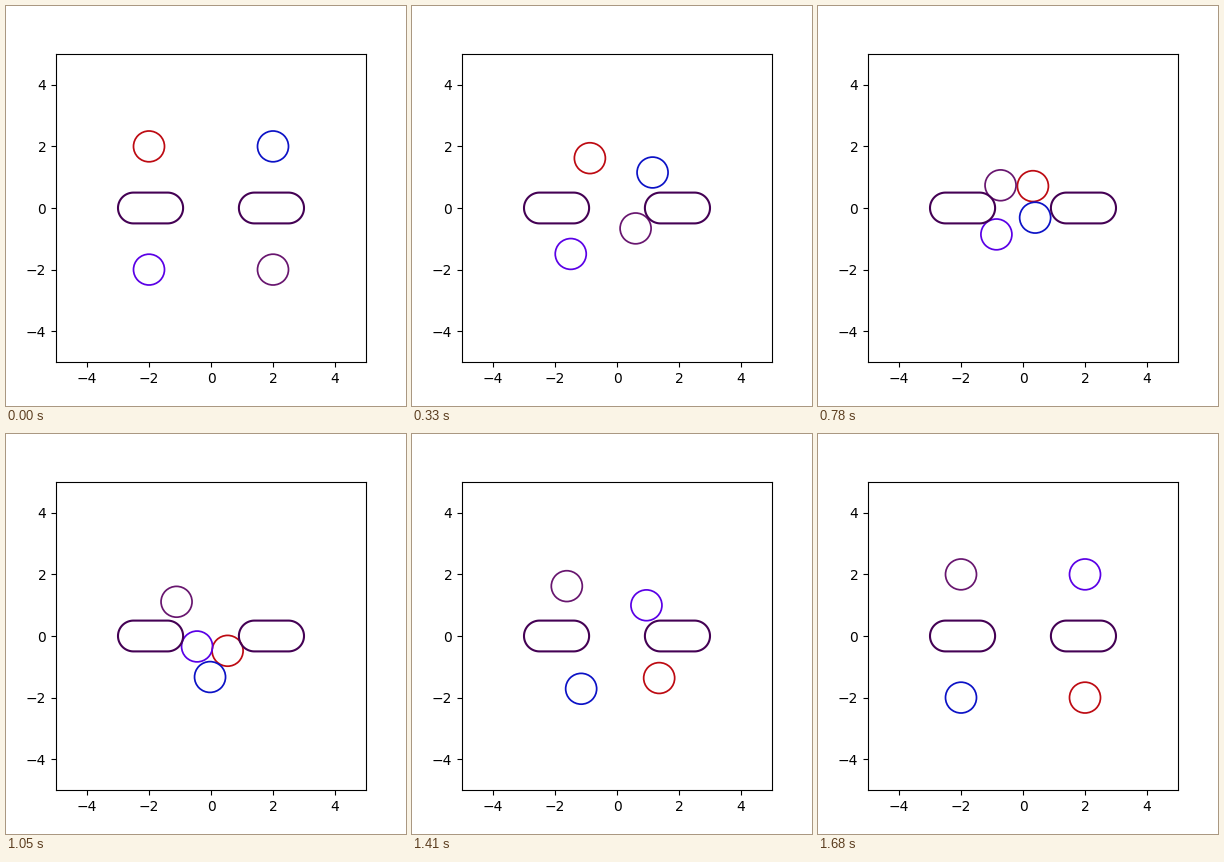
These frames come from a looping animation (400 by 400 pixels, 1710 ms). A matplotlib script:

```python
import numpy as np
import matplotlib.pyplot as plt
from matplotlib.animation import FuncAnimation
from matplotlib.patches import Circle, Polygon

RADIUS = 0.5
LAST = 38      # final step of the plan
TICKS = 57     # 30 ms ticks per loop
CAP = np.array([-1.4, 0])  # centre of the left capsule's inner end

# Key points (step, x, y), joined at constant speed.
OUTER = [(0, -2, 2), (15.5, 0.18, 1.26), (18, 0.32, 0.71),
         (24.4, 0.55, -0.56), (LAST, 2, -2)]
INNER = [(0, 2, -2), (14, -0.45, 0.34), (15, -0.54, 0.54), (LAST, -2, 2)]


def along(path, step):
    t, x, y = zip(*path)
    pos = np.array([np.interp(step, t, x), np.interp(step, t, y)])
    # Slide around the capsule end instead of overlapping it.
    offset = pos - CAP
    gap = np.hypot(*offset)
    if gap < 2 * RADIUS:
        pos = CAP + offset * 2 * RADIUS / gap
    return pos


def mirrored(path, step):
    """Same path, flipped in y and run backwards."""
    return along(path, LAST - step) * (1, -1)


def capsule(x0, x1):
    a = np.linspace(-np.pi / 2, np.pi / 2, 60)
    cap = RADIUS * np.c_[np.cos(a), np.sin(a)]
    return Polygon(np.vstack([cap + (x1, 0), -cap + (x0, 0)]), fill=False,
                   ec="#440154", lw=1.5, zorder=2)


fig, ax = plt.subplots(figsize=(4, 4), dpi=100)
ax.set(xlim=(-5, 5), ylim=(-5, 5),
       xticks=range(-4, 5, 2), yticks=range(-4, 5, 2))
ax.add_patch(capsule(-2.5, -1.4))
ax.add_patch(capsule(1.4, 2.5))

MOVERS = [
    ("#bd0a12", along, OUTER),
    ("#0c12c6", mirrored, OUTER),
    ("#5a00e6", mirrored, INNER),
    ("#68166f", along, INNER),
]
discs = [ax.add_patch(Circle(move(path, 0), RADIUS, fill=False, ec=color, lw=1.25))
         for color, move, path in MOVERS]


def update(tick):
    step = tick - tick // 3  # two steps every three ticks
    for disc, (_, move, path) in zip(discs, MOVERS):
        disc.center = move(path, step)
    return discs


anim = FuncAnimation(fig, update, frames=TICKS, interval=30,
                     repeat=True, repeat_delay=0, blit=False)
plt.show()
```
